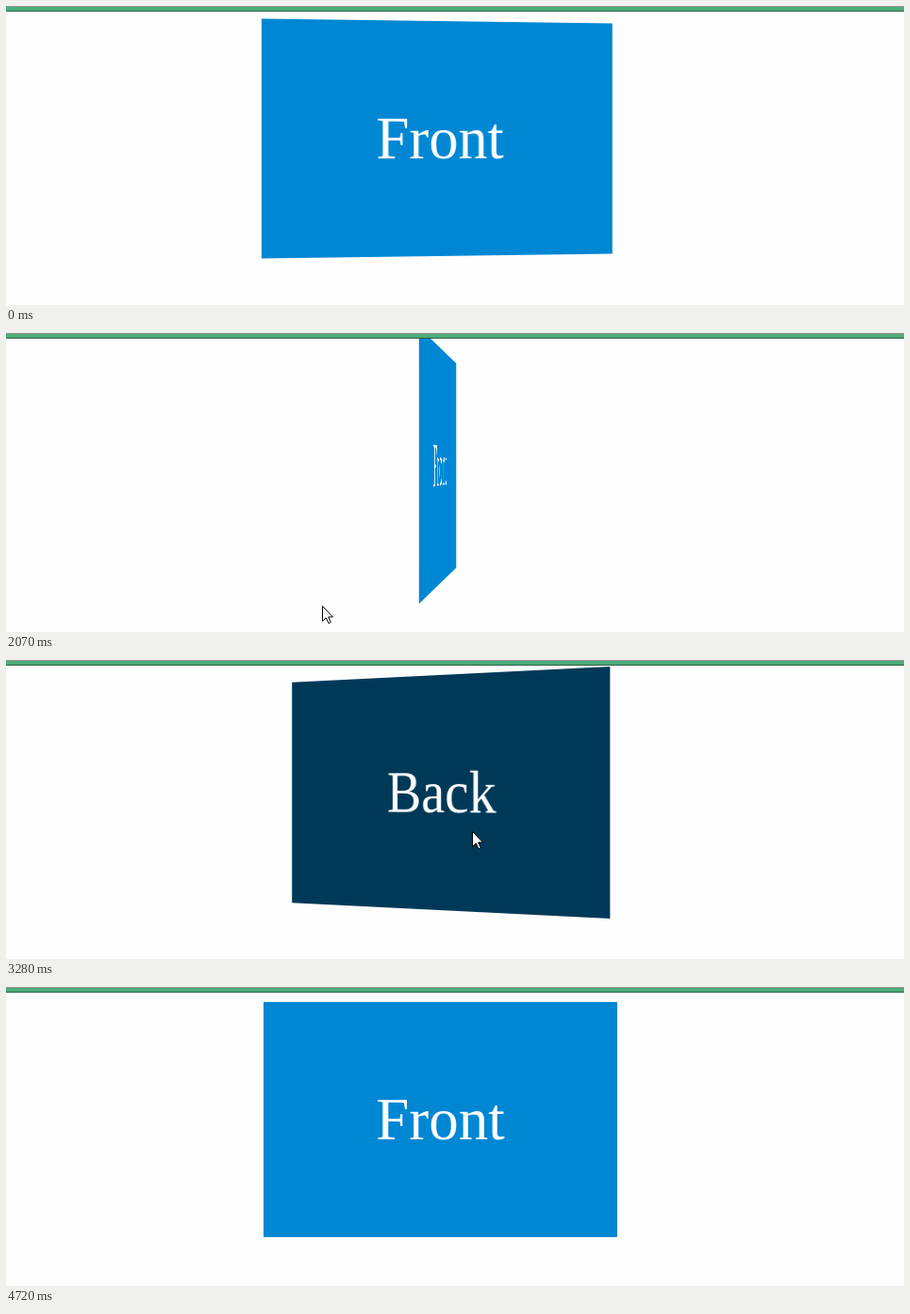
Write an HTML page that moves like this. It is 952 by 318 pixels and loops after 5100 ms.

```html
<!DOCTYPE html>
<html lang="en">
<head>
<meta charset="utf-8">
<title>Flip card</title>
<style>
  html, body { margin: 0; width: 100%; height: 100%; overflow: hidden; background: #fefefe; }
  #card {
    position: absolute; left: 273px; top: 16px; width: 375px; height: 250px;
    color: #fff; font: 63px/250px "Liberation Serif", "Times New Roman", serif; text-align: center;
  }
  #bar {
    position: absolute; left: 0; top: 0; width: 100%; height: 6px;
    background: linear-gradient(#94908f 1px, #4bad79 1px 5px, #2d6147 5px);
  }
  svg { position: absolute; left: 0; top: 0; overflow: visible; }
</style>
</head>
<body>
<div id="card"></div>
<div id="bar"></div>
<svg id="pointer" width="20" height="20">
  <path id="arrow" d="M.5.5V16.5L4.3 13L7 18.7L9.3 17.7L6.7 12H11.5Z" fill="#fff" stroke="#000"/>
  <path id="beam" d="M-3-7.5H0M1-7.5H4M.5-7V7M-3 7.5H0M1 7.5H4" fill="none" stroke="#d5dde2"/>
</svg>
<script>
const LOOP = 5100, STEP = 121, FLIP = 800;

// Start times of the flips, alternately to the front and to the back
const flips = [-595, 649, 1809, 2822, 3929];

// Pointer visits: key points as [time, x, y]
const visits = [
  { end: 2300, path: [[605, 494, 262], [847, 502, 168], [1573, 503, 170], [2057, 335, 290]] },
  { end: 4700, path: [[2783, 486, 255], [2904, 493, 185], [3630, 496, 172], [3993, 440, 325], [4356, 430, 285]] }
];

const el = id => document.getElementById(id);
const [card, pointer, arrow, beam] = ["card", "pointer", "arrow", "beam"].map(el);
const show = (node, on) => node.style.display = on ? "" : "none";

// cubic-bezier(.25, .1, .25, 1), solved for its parameter by bisection
function ease(x) {
  if (x >= 1) return 1;
  let u = .5;
  for (let d = .25; d > 1e-4; d /= 2) u += .75 * u * (1 - u) + u ** 3 < x ? d : -d;
  return .3 * u * (1 - u) ** 2 + 3 * u * u * (1 - u) + u ** 3;
}

function cardAngle(time) {
  const i = flips.findLastIndex(start => start <= time);
  const turn = 180 * ease((time - flips[i]) / FLIP);
  return i % 2 ? turn : 180 - turn;
}

function pointerAt(time) {
  const visit = visits.find(({ path, end }) => path[0][0] <= time && time < end);
  if (!visit) return null;
  const i = visit.path.findLastIndex(key => key[0] <= time);
  const a = visit.path[i], b = visit.path[i + 1] || a;
  const p = a === b ? 0 : ((time - a[0]) / (b[0] - a[0])) ** 2;
  return [1, 2].map(k => Math.round(a[k] + (b[k] - a[k]) * p));
}

function draw(now) {
  // The picture advances in fixed steps
  const time = Math.floor(Math.max(0, now) % LOOP / STEP) * STEP;
  const angle = cardAngle(time);
  const back = angle > 90;

  card.textContent = back ? "Back" : "Front";
  card.style.background = back ? "#003957" : "#0087d4";
  card.style.transform = `perspective(1250px) rotateY(${back ? angle - 180 : angle}deg)`;

  const spot = pointerAt(time);
  show(pointer, spot);
  if (!spot) return;
  const [x, y] = spot;
  const overText = angle > 140 && y < 177;
  show(arrow, !overText);
  show(beam, overText);
  pointer.style.transform = `translate(${x}px, ${y}px)`;
}

const start = performance.now();
function tick(now) {
  draw(now - start);
  requestAnimationFrame(tick);
}
draw(0);
requestAnimationFrame(tick);
</script>
</body>
</html>
```
